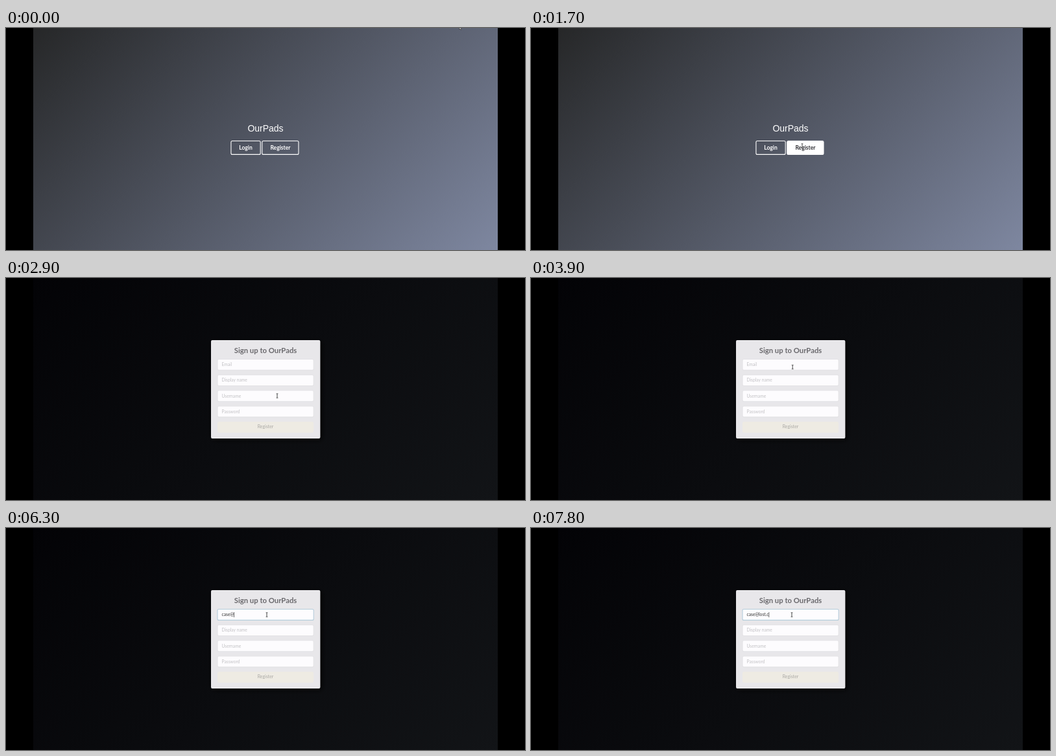
An HTML page with a canvas that plays this animation: 800 px wide and 343 px high, repeating every 8 s.

```html
<!DOCTYPE html>
<html lang="en">
<head>
<meta charset="utf-8">
<title>Sign up</title>
<style>
html, body { margin: 0; width: 100%; height: 100%; overflow: hidden; background: #000; }
canvas { display: block; }
</style>
</head>
<body>
<canvas id="stage" width="800" height="343"></canvas>
<script>
const ctx = document.getElementById('stage').getContext('2d');
const LOOP = 8000, STEP = 100, HOVER = 1200, OPEN = 2900, FOCUS = 4000;
const APP = 'OurPads';
const LATO = 'Lato, sans-serif', ARIAL = '"Liberation Sans", Arial, sans-serif';
const FIELDS = ['Email', 'Display name', 'Username', 'Password'];
const LEFT = 326, FIELD_W = 148.2, FIELD_H = 16.9;
const fieldY = i => 125.5 + i * 24.15;

const BURSTS = [
  { start: 4800, pace: 160, chars: 'case' },
  { start: 6300, pace: 0, chars: '@' },
  { start: 7050, pace: 150, chars: 'lost.c' }
];

const START = { x: 698.5, y: -4 };
const MOVES = [
  { start: 0, end: 900, x: 444, y: 132 },
  { start: 900, end: 1300, x: 418, y: 182 },
  { start: 3100, end: 4200, x: 402, y: 134 }
];

const clamp = v => Math.min(1, Math.max(0, v));
const easeOut = u => 1 - (1 - u) ** 2;

function diagonal(from, to) {
  // 135 degree gradient across the 716 x 343 page
  const half = (716 + 343) / 4;
  const g = ctx.createLinearGradient(400 - half, 171.5 - half, 400 + half, 171.5 + half);
  g.addColorStop(0, from);
  g.addColorStop(1, to);
  return g;
}

const PAGE = diagonal('#262728', '#7e87a0');
const DIMMED = diagonal('#030306', '#121417');

function box(x, y, w, h, fill, stroke) {
  ctx.beginPath();
  ctx.roundRect(x, y, w, h, 2);
  if (fill) { ctx.fillStyle = fill; ctx.fill(); }
  if (stroke) { ctx.strokeStyle = stroke; ctx.lineWidth = 1.1; ctx.stroke(); }
}

function text(str, x, y, font, color, align = 'center') {
  ctx.font = font;
  ctx.textAlign = align;
  ctx.fillStyle = color;
  ctx.fillText(str, x, y);
}

function pointerAt(t) {
  return MOVES.reduce((p, m) => {
    const k = easeOut(clamp((t - m.start) / (m.end - m.start)));
    return { x: p.x + (m.x - p.x) * k, y: p.y + (m.y - p.y) * k };
  }, START);
}

function arrow(x, y) {
  ctx.save();
  ctx.translate(x, y);
  ctx.fillStyle = '#fff';
  ctx.strokeStyle = '#222';
  ctx.lineWidth = .6;
  const shape = new Path2D('M0 0V6L1.4 4.8 2.4 7 3.3 6.6 2.4 4.4 4.2 4.3Z');
  ctx.fill(shape);
  ctx.stroke(shape);
  ctx.restore();
}

function beam(x, y) {
  ctx.fillStyle = '#444';
  ctx.fillRect(x - .5, y - 3.5, 1, 7);
  ctx.fillRect(x - 1.5, y - 3.5, 3, .7);
  ctx.fillRect(x - 1.5, y + 2.8, 3, .7);
}

function button(label, x, w, hover) {
  box(x, 174.5, w, 20.9, hover ? '#fff' : null, '#fff');
  text(label, x + w / 2, 188, 'bold 8.5px ' + LATO, hover ? '#333338' : '#fff');
}

function home(t) {
  text(APP, 400, 160.4, '14px ' + ARIAL, '#fff');
  button('Login', 346.9, 45.3, false);
  button('Register', 394.8, 56.2, t >= HOVER);
}

function typedAt(t) {
  let typed = '', last = FOCUS;
  for (const { start, pace, chars } of BURSTS)
    [...chars].forEach((c, i) => {
      const at = start + i * pace;
      if (at <= t) { typed += c; last = at; }
    });
  return { typed, caret: (t - last) % 1000 < 500 };
}

function dialog(t) {
  ctx.save();
  ctx.shadowColor = '#000';
  ctx.shadowBlur = 8;
  ctx.shadowOffsetX = ctx.shadowOffsetY = 2;
  box(316, 96, 168.4, 152, '#e8e7ea');
  ctx.restore();
  text('Sign up to ' + APP, 400, 115.6, 'bold 11.3px ' + LATO, '#6b6a6e');

  const { typed, caret } = typedAt(t);
  const font = '6.7px ' + LATO, textX = LEFT + 6.5;
  FIELDS.forEach((label, i) => {
    const y = fieldY(i), focused = i === 0 && t >= FOCUS, value = i === 0 && typed;
    box(LEFT, y, FIELD_W, FIELD_H, '#fdfcfe', focused ? '#b5cddb' : '#e4e3e6');
    text(value || label, textX, y + 10.8, font, value ? '#333' : '#c3c2c5', 'left');
    if (focused && caret) {
      ctx.fillStyle = '#333';
      ctx.fillRect(textX + ctx.measureText(typed).width, y + 4.5, .7, 8);
    }
  });
  box(LEFT, 222, FIELD_W, FIELD_H, '#eeebe3');
  text('Register', 400, 232.4, '6.9px ' + LATO, '#a9a8a4');
}

function draw(t) {
  const open = t >= OPEN;
  ctx.fillStyle = '#000';
  ctx.fillRect(0, 0, 800, 343);
  ctx.fillStyle = open ? DIMMED : PAGE;
  ctx.fillRect(42, 0, 716, 343);
  (open ? dialog : home)(t);

  const { x, y } = pointerAt(t);
  const overText = open
    ? FIELDS.some((_, i) => y >= fieldY(i) && y <= fieldY(i) + FIELD_H)
    : t >= HOVER;
  (overText ? beam : arrow)(x, y);
}

function tick() {
  const t = performance.now() % LOOP;
  draw(Math.floor(t / STEP) * STEP);
  requestAnimationFrame(tick);
}
tick();
</script>
</body>
</html>
```
